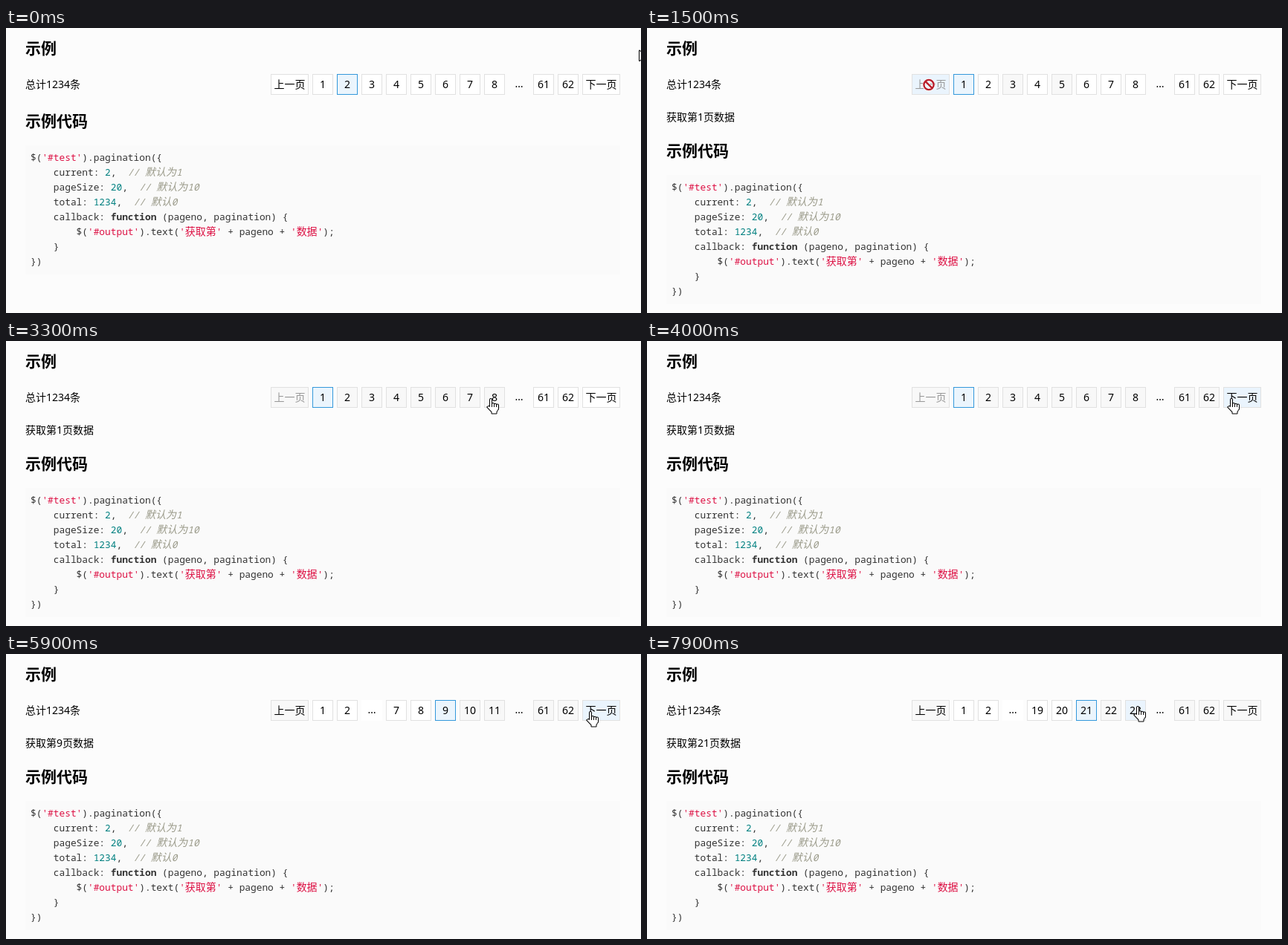
Write an HTML page with a canvas that moves like this. It is 854 px wide and 384 px high and loops after 8000 ms.

```html
<!DOCTYPE html>
<html lang="zh-CN">
<head>
<meta charset="utf-8">
<title>分页示例</title>
<style>
html, body { margin: 0; width: 100%; height: 100%; overflow: hidden; background: #fcfcfc; }
body { position: relative; color: #000; font: 14px/28px "Noto Sans", "Noto Sans CJK SC", "Noto Sans CJK", sans-serif; }
h2, p, pre, .slot, canvas { position: absolute; margin: 0; box-sizing: border-box; white-space: pre; }
h2 { left: 26px; top: 13px; font-size: 21px; line-height: 28px; }
p { left: 26px; top: 62px; }
#output { top: 106px; }
#lower { position: absolute; left: 0; top: 0; }
#lower h2 { top: 111px; }
pre { left: 26px; top: 158px; width: 800px; height: 174px; padding: 6px 7px; background: #fafafa; color: #333;
  font: 12.83px/20px "Noto Sans Mono", monospace; }
pre div { height: 20px; }
pre span { line-height: 0; }
.cjk { font-family: "Noto Sans CJK SC", "Noto Sans CJK", sans-serif; font-size: 14px; }
.str { color: #d14; }
.num { color: #008080; }
.key { font-weight: bold; }
.rem { color: #998; font-style: italic; }
.slot { top: 62px; height: 28px; line-height: 26px; border: 1px solid #e1e1e1; background: #fff;
  display: flex; justify-content: center; }
.tinted { background: #f8f8f8; }
.hover { background: #eaf4fd; }
.active { background: #ebf5fd; border-color: #3498db; }
.off { color: #999; }
.gap { border-color: transparent; line-height: 23px; }
canvas { left: 0; top: 0; }
</style>
</head>
<body>
<h2>示例</h2>
<p>总计1234条</p>
<p id="output"></p>
<div id="lower"><h2>示例代码</h2><pre id="code"></pre></div>
<canvas id="pointer" width="854" height="384"></canvas>
<script>
const LOOP = 8000, STEP = 100;
const $ = id => document.getElementById(id);

const code = `$('#test').pagination({
    current: 2,  // 默认为1
    pageSize: 20,  // 默认为10
    total: 1234,  // 默认0
    callback: function (pageno, pagination) {
        $('#output').text('获取第' + pageno + '数据');
    }
})`;
const styles = ['rem', 'str', 'key', 'num'];
const highlight = line => line
  .replace(/(\/\/.*)|('.*?')|(\bfunction\b)|(\b\d+\b)/g, (token, ...groups) =>
    `<span class="${styles[groups.findIndex(Boolean)]}">${token}</span>`)
  .replace(/[\u4e00-\u9fff]+/g, '<span class="cjk">$&</span>');
$('code').innerHTML = code.split('\n').map(line => `<div>${highlight(line)}</div>`).join('');

// Pager slots: previous, eight numbers, gap, last two, next
const PREV = 0, GAP = 9, NEXT = 12;
const slots = Array.from({ length: NEXT + 1 }, (_, i) => {
  const x = i === PREV ? 356 : 379 + 33 * i;
  const w = i === PREV || i === NEXT ? 51 : 28;
  const el = document.createElement('div');
  el.style.left = x + 'px';
  el.style.width = w + 'px';
  document.body.insertBefore(el, $('pointer'));
  return { x, w, el };
});

// Back one page, forward once, then two bursts of evenly paced clicks
const BACK = 1500, FORWARD = 4500, BURST = 4900, SKIP = 7400, PACE = 164;
const presses = (t, from) => 1 + Math.floor((t + STEP / 2 - from) / PACE);

function pageAt(t) {
  if (t < BACK) return 2;
  if (t < FORWARD) return 1;
  if (t < BURST) return 2;
  if (t < SKIP) return Math.min(13, 2 + presses(t, BURST));
  return 13 + 2 * presses(t, SKIP);
}

const activeSlot = page => Math.min(page, 6);

function labels(page) {
  const near = page < 6 ? [3, 4, 5, 6, 7, 8] : ['…', ...[-2, -1, 0, 1, 2].map(d => page + d)];
  return ['上一页', 1, 2, ...near, '…', 61, 62, '下一页'];
}

// Pointer stops: time, x, y, easing towards the stop
const linear = k => k;
const easeOut = k => 1 - (1 - k) ** 2.5;
const easeInOut = k => k * k * (3 - 2 * k);
const stops = [
  [0, 851, 29, linear],
  [400, 554, 66, linear],
  [1100, 379, 77, easeOut],
  [2000, 379, 77, linear],
  [2600, 490, 79, linear],
  [2900, 552, 78, linear],
  [3800, 776, 78, linear],
  [4000, 786, 78, easeOut],
  [6700, 786, 78, linear],
  [7200, 660, 71, easeInOut],
  [LOOP, 660, 71, linear]
];

function pointerAt(t) {
  const i = Math.max(1, stops.findIndex(s => s[0] >= t));
  const [t0, x0, y0] = stops[i - 1], [t1, x1, y1, ease] = stops[i];
  const k = ease((t - t0) / (t1 - t0));
  return [Math.round(x0 + (x1 - x0) * k), Math.round(y0 + (y1 - y0) * k)];
}

function slotAt(t) {
  if (t < 0) return -1;
  const [x, y] = pointerAt(t);
  return slots.findIndex((s, i) => i !== GAP && x >= s.x && x < s.x + s.w && y >= 62 && y < 90);
}

// Slots the pointer has touched keep a tint until they become the current page
function tintedAt(t) {
  const set = new Set();
  for (let s = 0; s <= t; s += STEP) {
    set.add(slotAt(s));
    set.delete(activeSlot(pageAt(s)));
  }
  return set;
}

const ctx = $('pointer').getContext('2d');
const arrow = new Path2D('M1 1.5V15L4.3 12L6.8 17.5L8.2 17L5.8 11.5H10.5Z');
const hand = new Path2D('M5 12H15.5V15L13.5 18.5V20.5H7.5V18.5L1.3 12L3 11Z');
hand.roundRect(5, 1, 2, 13, 1);
for (let i = 0; i < 3; i++) hand.roundRect(8 + 3 * i, 7 + 0.8 * i, 2, 7, 1);

function outline(shape) {
  ctx.lineWidth = 2;
  ctx.lineJoin = 'round';
  ctx.fillStyle = '#fff';
  ctx.strokeStyle = '#000';
  ctx.stroke(shape);
  ctx.fill(shape);
}

function drawBlocked() {
  ctx.beginPath();
  ctx.arc(0, 0, 6.6, 0, 7);
  ctx.moveTo(-4.6, -4.6);
  ctx.lineTo(4.6, 4.6);
  for (const [width, color] of [[4, '#fff'], [2.4, '#b9202c']]) {
    ctx.lineWidth = width;
    ctx.strokeStyle = color;
    ctx.stroke();
  }
}

function drawPointer(t, page) {
  const [x, y] = pointerAt(t), slot = slotAt(t);
  ctx.clearRect(0, 0, 854, 384);
  ctx.save();
  if (slot < 0) {
    ctx.translate(x, y);
    outline(arrow);
  } else if (slot === PREV && page === 1) {
    ctx.translate(x, y - 0.5);
    drawBlocked();
  } else {
    ctx.translate(x - 6, y - 1);
    outline(hand);
  }
  ctx.restore();
}

function render(t) {
  const page = pageAt(t), text = labels(page), tinted = tintedAt(t);
  const hover = slotAt(t) === slotAt(t - STEP) ? slotAt(t) : -1;
  slots.forEach(({ el }, i) => {
    const style = ['slot'];
    if (tinted.has(i)) style.push('tinted');
    if (i === hover) style.push('hover');
    if (i === activeSlot(page)) style.push('active');
    if (i === PREV && page === 1) style.push('off');
    if (text[i] === '…') style.push('gap');
    el.className = style.join(' ');
    el.style.backgroundColor = i === GAP ? 'transparent' : '';
    el.textContent = text[i];
  });
  const loaded = t >= BACK;
  $('output').textContent = loaded ? `获取第${page}页数据` : '';
  $('lower').style.top = loaded ? '40px' : '0';
  drawPointer(t, page);
}

const start = performance.now();
let last = -1;
function tick() {
  const t = Math.floor(((performance.now() - start) % LOOP) / STEP) * STEP;
  if (t !== last) render(last = t);
  requestAnimationFrame(tick);
}
tick();
</script>
</body>
</html>
```
